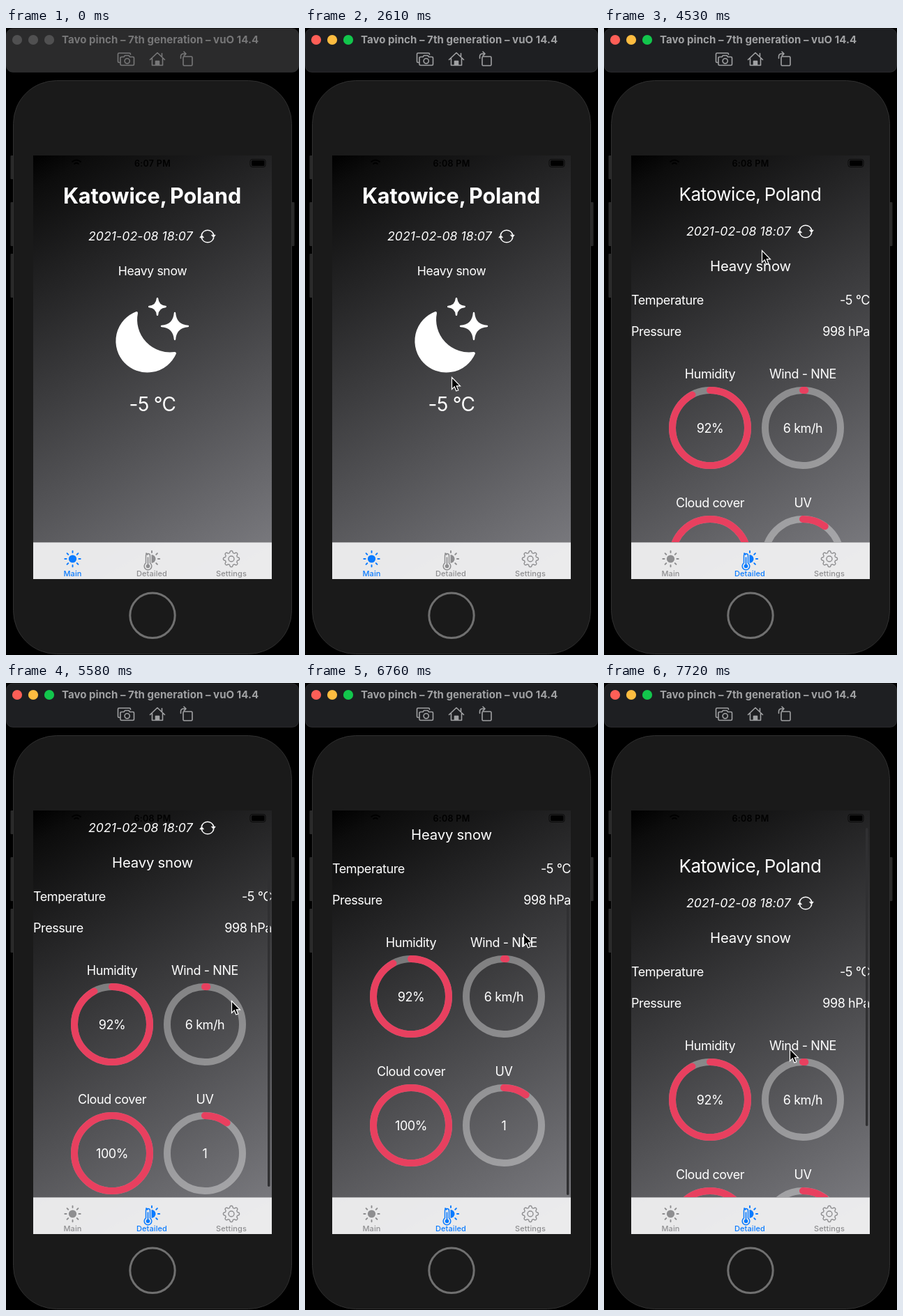
An HTML page that plays this animation: 420 by 900 pixels, repeating every 8 s.

```html
<!DOCTYPE html>
<html lang="en">
<head>
<meta charset="utf-8">
<title>Weather app demo</title>
<style>
html, body { margin: 0; height: 100%; overflow: hidden; background: #000; }
svg { display: block; width: 100vw; height: 100vh; font-family: Inter, "Liberation Sans", sans-serif; }
.line { fill: none; stroke-linecap: round; stroke-linejoin: round; }
.mid { text-anchor: middle; }
.end { text-anchor: end; }
.date { font-size: 17.6px; font-style: italic; letter-spacing: .08px; }
#page { fill: #fff; }
#tabs { font-size: 11px; font-weight: 500; letter-spacing: .1px; }
</style>
</head>
<body>
<svg viewBox="0 0 420 900">
  <defs>
    <linearGradient id="sky" gradientUnits="userSpaceOnUse" x1="39" y1="183" x2="381" y2="791">
      <stop stop-color="#000"/><stop offset=".06" stop-color="#0c0c0c"/><stop offset="1" stop-color="#808085"/>
    </linearGradient>
    <clipPath id="screen"><path d="M39 183H381V738H39z"/></clipPath>
    <g id="refresh" class="line" stroke="#fff" stroke-width="1.6">
      <path d="M-8.6 -2.2A8.9 8.9 0 0 1 8.6 -2.2M8.6 2.2A8.9 8.9 0 0 1 -8.6 2.2"/>
      <path d="M5.8 -1.8H11.2L8.6 1.6zM-5.8 1.8H-11.2L-8.6 -1.6z" fill="#fff" stroke-width=".8"/>
    </g>
  </defs>

  <rect id="bar" x=".5" y="1" width="419" height="62.3" rx="9" stroke="#333437" stroke-width=".8"/>
  <g id="lights"><circle cx="16" cy="17" r="7.1"/><circle cx="39" cy="17" r="7.1"/><circle cx="62" cy="17" r="7.1"/></g>
  <g id="tools">
    <text x="80" y="22" font-size="15" font-weight="700" letter-spacing=".05" fill="currentColor">Tavo pinch – 7th generation – vuO 14.4</text>
    <g class="line" stroke="currentColor" stroke-width="1.6">
      <path d="M163 49.500H162Q160.500 49.500 160.500 48V37.500Q160.500 36 162 36H177Q178.500 36 178.500 37.500V38"/>
      <path d="M166 41.500H169L170.500 39.500H176L177.500 41.500H182Q183.500 41.500 183.500 43V52Q183.500 53.500 182 53.500H165.500Q164 53.500 164 52V43Q164 41.500 166 41.500z"/>
      <circle cx="173.700" cy="47.300" r="3.600"/>
      <path d="M206.500 45.500L217 35.500L227.500 45.500M209.500 43.500V53.500H224.500V43.500M223.500 41V36.500"/>
      <path d="M214.500 53V47.500H219.500V53" fill="currentColor"/>
      <rect x="254" y="41" width="13" height="13" rx="1.500"/>
      <path d="M250.500 43.500V41Q250.500 37 254.500 37H257.500M255 34L258 37L255 40"/>
    </g>
  </g>

  <g fill="#292929">
    <rect x="6.500" y="183" width="6" height="34" rx="1"/><rect x="6.500" y="250" width="6" height="63" rx="1"/>
    <rect x="6.500" y="324" width="6" height="63" rx="1"/><rect x="407.500" y="250" width="6" height="63" rx="1"/>
  </g>
  <rect x="10.500" y="75.500" width="399" height="823" rx="62" fill="#1a1a1a" stroke="#303030"/>
  <circle cx="210" cy="843.300" r="32.200" fill="none" stroke="#707070" stroke-width="3"/>

  <path d="M39 183H381V791H39z" fill="url(#sky)"/>
  <text id="clock" class="mid" x="210" y="198.500" font-size="12.500" font-weight="600" letter-spacing=".3"></text>
  <rect x="350" y="188.500" width="22" height="11" rx="3" fill="none" stroke="#0a0a0a"/>
  <rect x="352" y="190" width="18.500" height="8" rx="1.500"/>
  <path class="line" d="M95 192Q101 187 107 192M98 195Q101 192.500 104 195" stroke="#000" stroke-width="1.800"/>

  <g id="page" clip-path="url(#screen)">
    <g id="main">
      <text class="mid" x="209.500" y="252" font-size="30.600" font-weight="700" letter-spacing="-.1" word-spacing="-2">Katowice, Poland</text>
      <text class="date" x="118" y="305">2021-02-08 18:07</text>
      <use href="#refresh" x="289" y="299"/>
      <text class="mid" x="210" y="355" font-size="17.600" letter-spacing="-.35">Heavy snow</text>
      <g stroke="#fff" stroke-width="4" stroke-linejoin="round">
        <path d="M187 409A43.200 43.200 0 1 0 242 467A49 49 0 0 1 187 409z"/>
        <g id="stars" stroke-width="2.400"></g>
      </g>
      <text class="mid" x="210" y="549.500" font-size="28" letter-spacing="-.7">-5 °C</text>
    </g>
    <g id="detail">
      <text class="mid" x="209.500" y="248" font-size="26" letter-spacing="-.4" word-spacing="-1.5">Katowice, Poland</text>
      <text class="date" x="118" y="298">2021-02-08 18:07</text>
      <use href="#refresh" x="289" y="292"/>
      <text class="mid" x="210" y="349" font-size="20.300" letter-spacing="-.2">Heavy snow</text>
      <g font-size="18" letter-spacing="-.42">
        <text x="39" y="397">Temperature</text><text class="end" x="381" y="397">-5 °C</text>
        <text x="39" y="441.500">Pressure</text><text class="end" x="381" y="441.500">998 hPa</text>
        <g id="rings"></g>
      </g>
    </g>
    <rect id="thumb" x="375" width="3.500" rx="1.750" fill="#303032"/>
  </g>

  <path d="M39 738.500H381V791H39z" fill="#f4f4f5" fill-opacity=".93"/>
  <path d="M39 738.500H381" stroke="#b5b5b7" stroke-width=".7"/>
  <g id="tabs" class="mid">
    <g stroke="currentColor" fill="currentColor">
      <circle cx="95.500" cy="762" r="5.600" stroke="none"/><path id="rays" class="line" stroke-width="1.900"/>
      <text x="95.500" y="787" stroke="none">Main</text>
    </g>
    <g stroke="currentColor" fill="currentColor">
      <path d="M208.500 756A6 6 0 0 1 208.500 768z" stroke="none"/>
      <path id="halfRays" class="line" stroke-width="1.900"/>
      <path class="line" d="M200.500 768V757.500A3 3 0 0 1 206.500 757.500V768A5.300 5.300 0 1 1 200.500 768z" stroke-width="1.500"/>
      <path class="line" d="M203.500 760V772" stroke-width="1.700"/><circle cx="203.500" cy="772.500" r="2.800" stroke="none"/>
      <text x="209" y="787" stroke="none">Detailed</text>
    </g>
    <g stroke="currentColor" fill="currentColor">
      <path id="gear" class="line" stroke-width="1.400"/><circle cx="323" cy="762" r="4" class="line" stroke-width="1.400"/>
      <text x="323" y="787" stroke="none">Settings</text>
    </g>
  </g>
  <path id="cursor" d="M.5 .5V17.500L4.300 13.900L6.800 20L9.800 18.800L7.300 12.800H12.500z" stroke="#fff" stroke-width="1.200"/>
</svg>
<script>
const $ = id => document.getElementById(id);
const LOOP = 8000, TICK = 96.2, TAU = Math.PI * 2;
const polar = (x, y, r, a) => `${(x + r * Math.cos(a)).toFixed(2)} ${(y + r * Math.sin(a)).toFixed(2)}`;

function rays(x, from, to) {
  let d = '';
  for (let i = from; i <= to; i++) {
    const a = i * TAU / 8;
    d += `M${polar(x, 762, 8.9, a)}L${polar(x, 762, 11.2, a)}`;
  }
  return d;
}

function star(x, y, r) {
  const c = r * .07;
  return `<path d="M${x} ${y - r}Q${x + c} ${y - c} ${x + r} ${y}Q${x + c} ${y + c} ${x} ${y + r}` +
    `Q${x - c} ${y + c} ${x - r} ${y}Q${x - c} ${y - c} ${x} ${y - r}z"/>`;
}

function ring(x, y, label, value, part) {
  const len = TAU * 54;
  return `<g class="mid"><text x="${x}" y="${y - 71}">${label}</text><text x="${x}" y="${y + 6.5}">${value}</text></g>
    <g class="line" stroke-width="10"><circle cx="${x}" cy="${y}" r="54" stroke="#fff" stroke-opacity=".36"/>
    <circle cx="${x}" cy="${y}" r="54" stroke="#e8405f" stroke-dasharray="${part * len} ${part < 1 ? len : 0}"
      transform="rotate(-90 ${x} ${y})"/></g>`;
}

$('rays').setAttribute('d', rays(95.5, 0, 7));
$('halfRays').setAttribute('d', rays(209, -3, 1));
$('stars').innerHTML = star(217, 400, 11.8) + star(242, 428, 19);
$('rings').innerHTML = ring(152, 574, 'Humidity', '92%', .92) + ring(285, 574, 'Wind - NNE', '6 km/h', .01) +
  ring(152, 759, 'Cloud cover', '100%', 1) + ring(285, 759, 'UV', '1', .1);
$('gear').setAttribute('d', 'M' + Array.from({ length: 96 }, (_, i) => {
  const a = i * TAU / 96;
  return polar(323, 762, 10.2 + 1.4 * Math.tanh(2 * Math.cos(8 * a)), a);
}).join('L') + 'z');

const pointer = [
  [1, 402, 660], [8, 246, 821], [9, 242, 800], [17, 208, 326], [18, 208, 324], [19, 212, 336], [20, 212, 336],
  [21, 210, 400], [22, 210, 501], [25, 223, 745], [26, 224, 756], [30, 224, 756], [37, 236, 310], [38, 236, 296],
  [42, 226, 319], [46, 355, 512], [47, 357, 522], [50, 354, 556], [51, 354, 556], [52, 344, 515], [53, 323, 456],
  [54, 318, 415], [55, 315, 386], [57, 313, 360], [65, 313, 360], [70, 261, 385], [71, 261, 385],
  [72, 261, 409], [75, 266, 525]
];
const scroll = [
  [51, 0], [52, 28], [53, 84], [54, 112], [55, 127], [57, 139], [64, 139], [65, 124], [66, 112], [67, 106],
  [68, 103], [70, 100], [71, 100], [72, 80], [74, 2], [75, -24]
];

function at(keys, n) {
  const i = keys.findIndex(k => k[0] > n);
  if (i < 0) return keys[keys.length - 1].slice(1);
  if (i === 0) return keys[0].slice(1);
  const a = keys[i - 1], b = keys[i], p = (n - a[0]) / (b[0] - a[0]);
  return a.slice(1).map((v, j) => v + (b[j + 1] - v) * p);
}

const show = (id, on) => $(id).setAttribute('visibility', on ? 'visible' : 'hidden');

function draw(n) {
  const active = n >= 5, detailed = n >= 30;
  $('bar').setAttribute('fill', active ? '#1e1f22' : '#2b2b2c');
  $('tools').setAttribute('color', active ? '#a0a1a3' : '#777778');
  [...$('lights').children].forEach((c, i) =>
    c.setAttribute('fill', active ? ['#fe5f57', '#fdbc40', '#12c64c'][i] : '#505051'));
  $('clock').textContent = n < 13 ? '6:07 PM' : '6:08 PM';

  show('main', !detailed);
  show('detail', detailed);
  [...$('tabs').children].forEach((tab, i) =>
    tab.setAttribute('color', i === +detailed ? '#0a7bff' : '#8e8e90'));

  const [s] = at(scroll, n);
  $('detail').setAttribute('transform', `translate(0 ${-s})`);
  const top = 208 + .75 * Math.min(100, Math.max(0, s)) + Math.min(39, Math.max(0, s - 100) * 1.54);
  const bottom = Math.min(735, 660 + (s < 0 ? s : .75 * s));
  $('thumb').setAttribute('y', top);
  $('thumb').setAttribute('height', bottom - top);
  show('thumb', n >= 52);

  show('cursor', n >= 1);
  $('cursor').setAttribute('transform', `translate(${at(pointer, n)})`);
}

function frame(now) {
  draw(Math.floor((now % LOOP - 480) / TICK));
  requestAnimationFrame(frame);
}
draw(-1);
requestAnimationFrame(frame);
</script>
</body>
</html>
```
